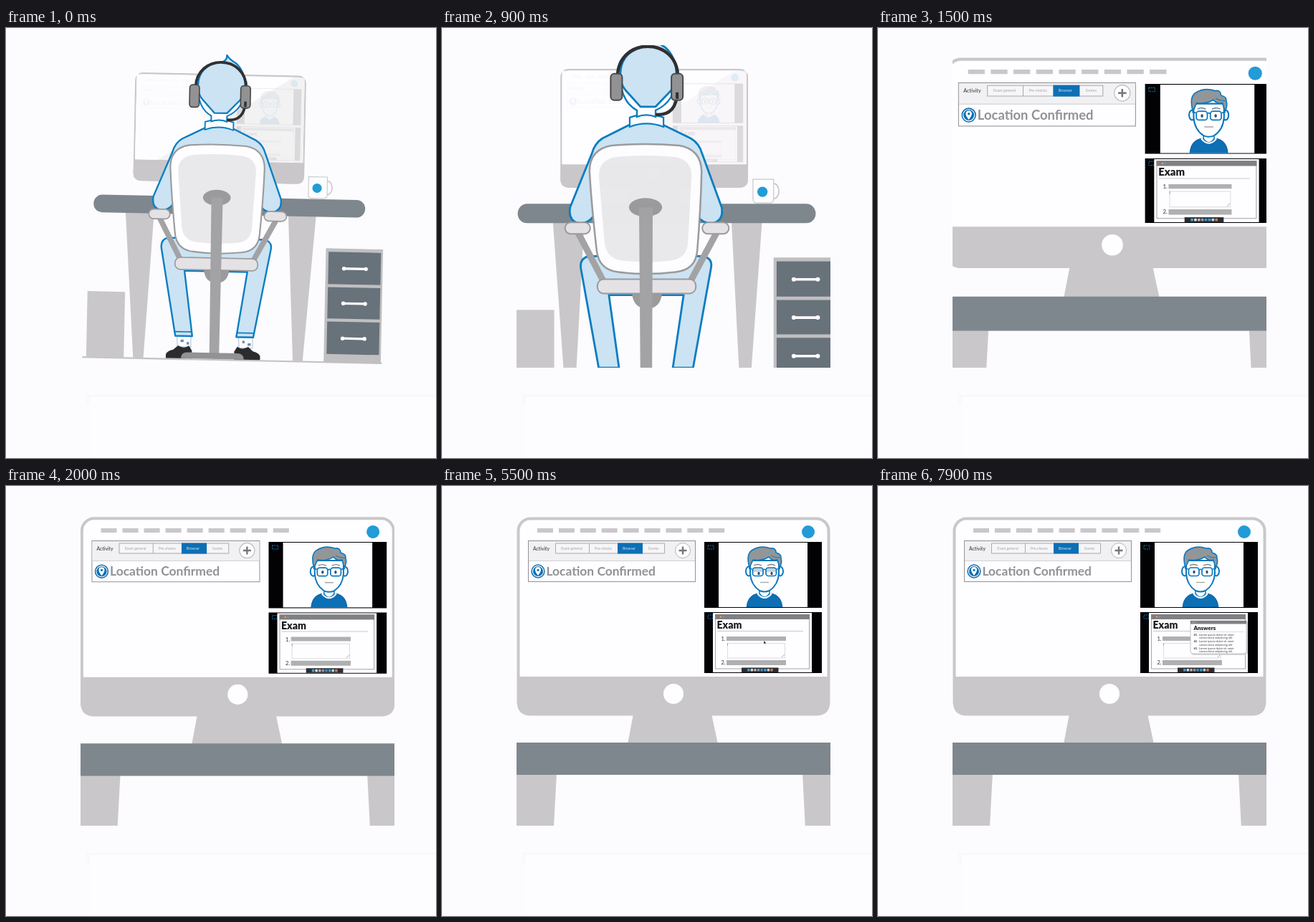
Write an HTML page that moves like this. It is 600 by 600 pixels and loops after 8 s.

```html
<!DOCTYPE html>
<html lang="en">
<head>
<meta charset="utf-8">
<title>Online exam</title>
<style>
  html, body { margin: 0; width: 100%; height: 100%; overflow: hidden; background: #fcfbfe; }
  svg { display: block; width: 100vw; height: 100vh; }
  text { font-family: Lato, "Open Sans", sans-serif; }
  .tab { font-size: 5px; fill: #a5a4a8; text-anchor: middle; }
  .line { fill: none; stroke: #0b7dc0; }
  .body { fill: #cbe3f3; stroke: #0b7dc0; stroke-width: 2.8; stroke-linejoin: round; }
  .soft { fill: #e4e2e5; stroke: #9b9a9c; stroke-width: 2; }
</style>
</head>
<body>
<svg viewBox="0 0 600 600">
  <defs>
    <clipPath id="view"><rect x="104" y="24" width="438" height="450"/></clipPath>
    <clipPath id="screenClip"><rect x="108" y="48" width="430" height="218"/></clipPath>
    <clipPath id="camClip"><rect x="386" y="79" width="124" height="90"/></clipPath>
  </defs>
  <rect width="600" height="600" fill="#fcfbfe"/>
  <path d="M112 511H600V516H117V526H112Z" fill="#f9f8fb"/>
  <rect x="117" y="515" width="483" height="85" fill="#fdfcff"/>

  <g clip-path="url(#view)">
    <g id="world">
      <path d="M-16 774H750" stroke="#c4c2c5" stroke-width="4"/>
      <rect x="-6" y="605" width="96" height="169" fill="#c9c7ca"/>
      <path d="M87 400H160L140 774H114ZM503 400H574L547 774H522Z" fill="#c9c7ca"/>
      <rect x="601" y="483" width="146" height="291" fill="#c0bfc1"/>
      <g id="drawers"></g>
      <path d="M267 318H376L385 360H259Z" fill="#c9c7ca"/>
      <rect x="5" y="358" width="694" height="45" rx="22" fill="#7f878e"/>

      <path d="M598 311H602A11 17 0 0 1 602 346H598" fill="none" stroke="#c9c7ca" stroke-width="3"/>
      <path d="M553 301H601V346Q601 356 592 356H562Q553 356 553 346Z" fill="#fdfcff" stroke="#c9c7ca" stroke-width="2"/>
      <circle cx="575" cy="330" r="12" fill="#229bd7"/>

      <rect x="106.500" y="45.500" width="433" height="273" rx="17" fill="#fefdff" stroke="#c9c7ca" stroke-width="4"/>
      <path d="M105 266H541V302Q541 320 523 320H123Q105 320 105 302Z" fill="#c9c7ca"/>
      <circle cx="323" cy="290" r="14" fill="#fefdff"/>

      <g clip-path="url(#screenClip)">
        <path d="M133 62H400" stroke="#c9c7ca" stroke-width="6" stroke-dasharray="22 7.900"/>
        <circle cx="511" cy="64" r="9" fill="#229bd7"/>

        <rect x="120.500" y="76.500" width="233" height="57" fill="#fefdff" stroke="#929195"/>
        <path d="M121 77H353V104H121Z" fill="#f1f0f3"/>
        <path d="M121 104.500H353" stroke="#d2d1d4"/>
        <text x="127" y="89.700" font-size="6.800" fill="#333">Activity</text>
        <path d="M158.500 80H310.500V94H158.500ZM205.500 80V94" fill="#f6f5f8" stroke="#aaa9ad"/>
        <rect x="245" y="79.500" width="35" height="15" fill="#0d6fb4"/>
        <text class="tab" x="181" y="88.500">Exam general</text>
        <text class="tab" x="225" y="88.500">Pre-checks</text>
        <text class="tab" x="261" y="88.500" style="fill:#cfe5f5">Browser</text>
        <text class="tab" x="295" y="88.500">Scores</text>
        <circle cx="336" cy="90" r="10.500" fill="#fefdff" stroke="#b5b4b7"/>
        <path d="M330.500 90H341.500M336 84.500V95.500" stroke="#77767a" stroke-width="2.400"/>
        <circle cx="134" cy="119" r="8.900" fill="#fff" stroke="#0d6fb4" stroke-width="1.500"/>
        <circle cx="134" cy="119" r="7" fill="#0d6fb4"/>
        <path d="M134 125Q129.500 119 130 117A4 4 0 0 1 138 117Q138.500 119 134 125Z" fill="#fff"/>
        <circle cx="134" cy="117.300" r="1.600" fill="#0d6fb4"/>
        <text x="145.500" y="125" font-size="17.400" font-weight="700" fill="#929195">Location Confirmed</text>

        <path d="M366 78H530V170H366ZM366 176H530V261H366Z" fill="#020204"/>
        <path d="M371 83H379V88H371ZM371 180H378V185H371Z" fill="none" stroke="#176fa8" stroke-dasharray="2 1"/>
        <rect x="386" y="79" width="124" height="90" fill="#fefdff"/>
        <g clip-path="url(#camClip)" stroke-linejoin="round">
          <path d="M425 170Q426 153 440 150L450 155L460 150Q474 153 475 170Z" fill="#0d6fb4" stroke="#0a5f9f"/>
          <path d="M443 142V150Q450 160 457 150V142Z" fill="#fff" stroke="#0d78bd" stroke-width="1.500"/>
          <path d="M440 150Q450 162 460 150" fill="none" stroke="#fff" stroke-width="2"/>
          <g fill="#fff" stroke="#0d78bd" stroke-width="2">
            <ellipse cx="428" cy="119" rx="4" ry="6.500"/>
            <ellipse cx="472" cy="119" rx="4" ry="6.500"/>
            <path d="M430 104H470V122Q469 138 457 146Q450 149 443 146Q431 138 430 122Z"/>
          </g>
          <path d="M429 114Q424 96 432 90Q444 82 458 87Q466 86 466 93Q474 95 473 101Q475 107 471 114L468 103Q461 105 456 99Q446 105 434 103Z" fill="#929699" stroke="#0d78bd" stroke-width="1.600"/>
          <path d="M459 97Q466 101 473 100" class="line" stroke-width="1"/>
          <path d="M435 111Q440 108 446 111M454 111Q460 108 465 111" fill="none" stroke="#777c82" stroke-width="1.300"/>
          <g id="eyes" fill="#25506f"><ellipse cx="441" cy="120" rx="1.600" ry="2.300"/><ellipse cx="459" cy="120" rx="1.600" ry="2.300"/></g>
          <path id="lids" d="M434 114H448V120H434ZM452 114H466V120H452Z" fill="#c6d3de"/>
          <g fill="none" stroke="#0d78bd" stroke-width="1.700">
            <rect x="433.500" y="114" width="14.500" height="11.500" rx="3.500"/>
            <rect x="452" y="114" width="14.500" height="11.500" rx="3.500"/>
            <path d="M448 117Q450 115.500 452 117M433 116L428 115M467 116L472 115"/>
          </g>
          <path d="M444 134.500H456" stroke="#a4a5a8" stroke-width="1.300"/>
        </g>

        <rect x="378" y="177" width="138" height="83" fill="#fefdff"/>
        <rect x="381.500" y="179.500" width="131" height="75.500" fill="#fefdff" stroke="#a6a5a9"/>
        <rect x="381" y="179" width="132" height="7" fill="#7f8084"/>
        <path d="M384 182.500H386" stroke="#d2563f" stroke-width="2"/>
        <path d="M388 182.500H390" stroke="#e3a35c" stroke-width="2"/>
        <path d="M392 182.500H394" stroke="#679bb7" stroke-width="2"/>
        <text x="383.500" y="199" font-size="14" font-weight="900" fill="#1c1c1e">Exam</text>
        <path d="M384 202.500H504" stroke="#c9c8cc"/>
        <g font-size="7.500" fill="#333"><text x="389.500" y="216">1.</text><text x="389.500" y="249">2.</text></g>
        <path d="M397 210H480V216H397ZM397 243H480V250H397Z" fill="#b0afb2"/>
        <rect x="398.500" y="219.500" width="80" height="20.500" fill="#fefdff" stroke="#dcdbde"/>
        <path d="M398.500 219V223M474 239L478 235" stroke="#99989c" stroke-width=".8"/>
        <g id="popup">
          <path d="M437 189H516V232Q516 236 511 236H441Q437 236 437 232Z" fill="#d7d6da"/>
          <path d="M436 188H514V231Q514 234 510 234H440Q436 234 436 231Z" fill="#fefdff" stroke="#b5b4b8" stroke-width=".8"/>
          <rect x="436" y="188" width="78" height="4.500" fill="#7f8084"/>
          <path d="M438 190.200H444" stroke="#c0bfc4" stroke-dasharray="1.300 1"/>
          <text x="440.500" y="200.500" font-size="7.900" font-weight="900" fill="#1c1c1e">Answers</text>
          <path d="M440 203.500H510" stroke="#d0cfd3" stroke-width=".7"/>
          <g id="answers" font-size="4.100" fill="#444"></g>
        </g>
        <rect x="418" y="253.500" width="51.500" height="6.500" fill="#2a2c31"/>
        <g id="dock"></g>
        <path id="cursor" d="M0 0V4.200L1.100 3.300L2 5L2.800 4.600L2 3H3.300Z" fill="#111" stroke="#fff" stroke-width=".3"/>
        <g id="veil">
          <path d="M108 48H538V266H108Z" fill="#fefdff" opacity=".88"/>
          <path d="M108 48H360V266H108Z" fill="#fefdff" opacity=".5"/>
          <path id="glare" d="M510 48H538V266H165Z" fill="#c9c7ca"/>
        </g>
      </g>
    </g>

    <g id="person">
      <path d="M222 470H246V498H224ZM324 470H348V498H326Z" fill="#fdfcff" stroke="#9dbbd0"/>
      <path d="M229 488H234M239 492H243M331 488H335M340 492H345" stroke="#718aa8" stroke-width="4"/>
      <path d="M205 517V511Q207 505 217 503L225 496Q235 502 243 496L248 504V517ZM361 517V511Q359 505 349 503L341 496Q331 502 323 496L318 504V517Z" fill="#2c2c2e"/>
      <path class="body" d="M205 318H364Q378 321 375 335L349 480H321L337 372H233L248 480H220L194 335Q192 321 205 318Z"/>
      <path class="line" d="M219 473H247M322 473H350" stroke-width="2"/>

      <path class="body" d="M262 135Q285 130 308 135L347 154Q359 161 363 176L390 250Q393 268 378 272Q364 273 357 263L340 230H230L211 263Q204 273 190 272Q176 268 179 250L209 176Q213 161 224 154Z"/>
      <path d="M262 138V125Q273 121 285 121Q298 121 309 125V138Q285 129 262 138Z" fill="#fefdff" stroke="#0b7dc0" stroke-width="2.200"/>
      <path d="M249 70Q250 103 272 115V124Q285 119 298 124V115Q325 103 327 70Z" fill="#fefdff" stroke="#0b7dc0" stroke-width="2.400"/>
      <path class="body" d="M249 64Q250 32 285 26Q296 25 296 14Q299 20 311 27Q326 40 327 64Q328 78 319 88L298 110H277L257 88Q248 78 249 64Z"/>
      <path d="M245 68C246 12 328 12 329 68M328 90Q327 122 300 121" fill="none" stroke="#303032" stroke-width="4.500" stroke-linecap="round"/>
      <g fill="#929193" stroke="#4a494b" stroke-width="2">
        <rect x="235.500" y="64" width="16" height="37" rx="5"/>
        <rect x="320" y="64" width="16" height="37" rx="5"/>
      </g>
      <path d="M328 90V99" stroke="#303032" stroke-width="4"/>

      <path d="M190 285L226 354M383 285L346 354" stroke="#a3a2a4" stroke-width="9"/>
      <path d="M206 200Q206 169 237 164Q284 160 331 164Q361 169 362 200Q361 250 356 310Q354 337 326 340Q284 345 246 340Q219 337 216 310Q209 250 206 200Z" fill="#fefdff" stroke="#9b9a9c" stroke-width="2.500"/>
      <path d="M219 206Q219 184 243 180Q284 176 325 180Q348 184 348 206L343 300Q341 321 320 324Q284 328 250 324Q230 321 227 300Z" fill="#e9e8ea"/>
      <rect class="soft" x="172" y="271" width="35" height="16" rx="8"/>
      <rect class="soft" x="363" y="271" width="37" height="16" rx="8"/>
      <path d="M265 369H307Q305 391 286 391Q267 391 265 369Z" fill="#9b9a9c"/>
      <rect class="soft" x="217" y="350" width="137" height="20" rx="9"/>
      <ellipse cx="284" cy="250" rx="23" ry="13" fill="#9b9a9c"/>
      <path d="M275 250H294L293 510H277Z" fill="#a3a2a4"/>
      <path d="M230 517Q230 507 241 507H323Q334 507 334 517Z" fill="#929193"/>
    </g>
  </g>
</svg>
<script>
const $ = id => document.getElementById(id);
const LOOP = 8000;

$("drawers").innerHTML = [[492, 82], [582, 80], [670, 83]].map(([y, h]) => {
  const mid = y + h / 2 + 1;
  return `<rect x="608" y="${y}" width="134" height="${h}" fill="#68727b"/>
    <path d="M649 ${mid}H703" stroke="#fefdff" stroke-width="6"/>
    <circle cx="648" cy="${mid}" r="5" fill="#fefdff"/><circle cx="704" cy="${mid}" r="5" fill="#fefdff"/>`;
}).join("");

$("answers").innerHTML = [0, 1, 2].map(i => {
  const y = 208.8 + i * 9.6;
  return `<text x="440.500" y="${y}" font-weight="700">#${i + 1}.</text>
    <text x="448" y="${y}">Lorem ipsum dolor sit amet</text>
    <text x="448" y="${y + 4.3}">consectetur adipiscing elit</text>`;
}).join("");

$("dock").innerHTML = ["#3f9fd0", "#d9d9de", "#b9b2b0", "#8a9aa6", "#4f86b8", "#2aa0dc", "#c9c9cc", "#c07a62"]
  .map((c, i) => `<rect x="${426 + i * 4.6}" y="255" width="3.600" height="3.600" rx="1" fill="${c}"/>`).join("");

const clamp = v => Math.max(0, Math.min(1, v));
const ramp = (t, a, b) => clamp((t - a) / (b - a));
const smooth = v => v * v * (3 - 2 * v);
const mix = (a, b, v) => a + (b - a) * v;

// Keys are [time, value, slope per ms].
function hermite(keys, t) {
  const i = keys.findIndex(k => k[0] > t);
  if (i < 0) return keys[keys.length - 1][1];
  const [t0, a, m0] = keys[i - 1], [t1, b, m1] = keys[i];
  const d = t1 - t0, u = (t - t0) / d, v = 1 - u;
  return a * (1 + 2 * u) * v * v + m0 * d * u * v * v + b * u * u * (3 - 2 * u) - m1 * d * u * u * v;
}

// Points are [time, x, y]; each leg eases in and out.
function travel(points, t) {
  let [, x, y] = points[0];
  for (let i = 1; i < points.length; i++) {
    const u = smooth(ramp(t, points[i - 1][0], points[i][0]));
    x = mix(x, points[i][1], u);
    y = mix(y, points[i][2], u);
  }
  return [x, y];
}

const zoomKeys = [[0, .546, .00002], [900, .599, .0001], [1100, .854, .0011], [1500, 1.06, 0], [2100, 1, 0]];
const cursorPath = [[4500, 401, 223], [5500, 449, 216], [6300, 473, 218], [7300, 459, 256]];

function draw(t) {
  const settle = ramp(t, 0, 900);
  const tilt = 1.2 * (1 - settle);
  const ax = mix(262.8, 256, settle), ay = mix(81.8, 77, settle);
  $("world").setAttribute("transform",
    `translate(${ax} ${ay}) rotate(${tilt}) scale(${hermite(zoomKeys, t)}) translate(-256 -77)`);

  const leave = ramp(t, 900, 1090);
  const size = mix(.843, 1, settle) + leave * .5;
  $("person").setAttribute("transform",
    `translate(${mix(294.2, 284, settle)} ${mix(236.7, 250, settle) + leave * 40}) rotate(${tilt}) scale(${size}) translate(-284 -250)`);
  $("person").setAttribute("opacity", 1 - leave);

  $("veil").setAttribute("opacity", 1 - leave);
  $("glare").setAttribute("opacity", mix(.22, .12, settle));

  const [cx, cy] = travel(cursorPath, t);
  $("cursor").setAttribute("transform", `translate(${cx} ${cy})`);
  $("cursor").setAttribute("opacity", ramp(t, 2200, 2300) * (t < 7600 ? 1 : 0));

  const look = smooth(ramp(t, 4600, 5300)) * (1 - smooth(ramp(t, 6900, 7300)));
  $("eyes").setAttribute("transform", `translate(${look} ${look * 2})`);
  $("lids").setAttribute("opacity", look);

  const open = 1 - (1 - ramp(t, 7500, 7850)) ** 2;
  $("popup").setAttribute("transform", `translate(460 256) scale(${open}) translate(-460 -256)`);
  $("popup").setAttribute("opacity", open > 0 ? 1 : 0);
}

const start = performance.now();
function tick() {
  draw((performance.now() - start) % LOOP);
  requestAnimationFrame(tick);
}
tick();
</script>
</body>
</html>
```
